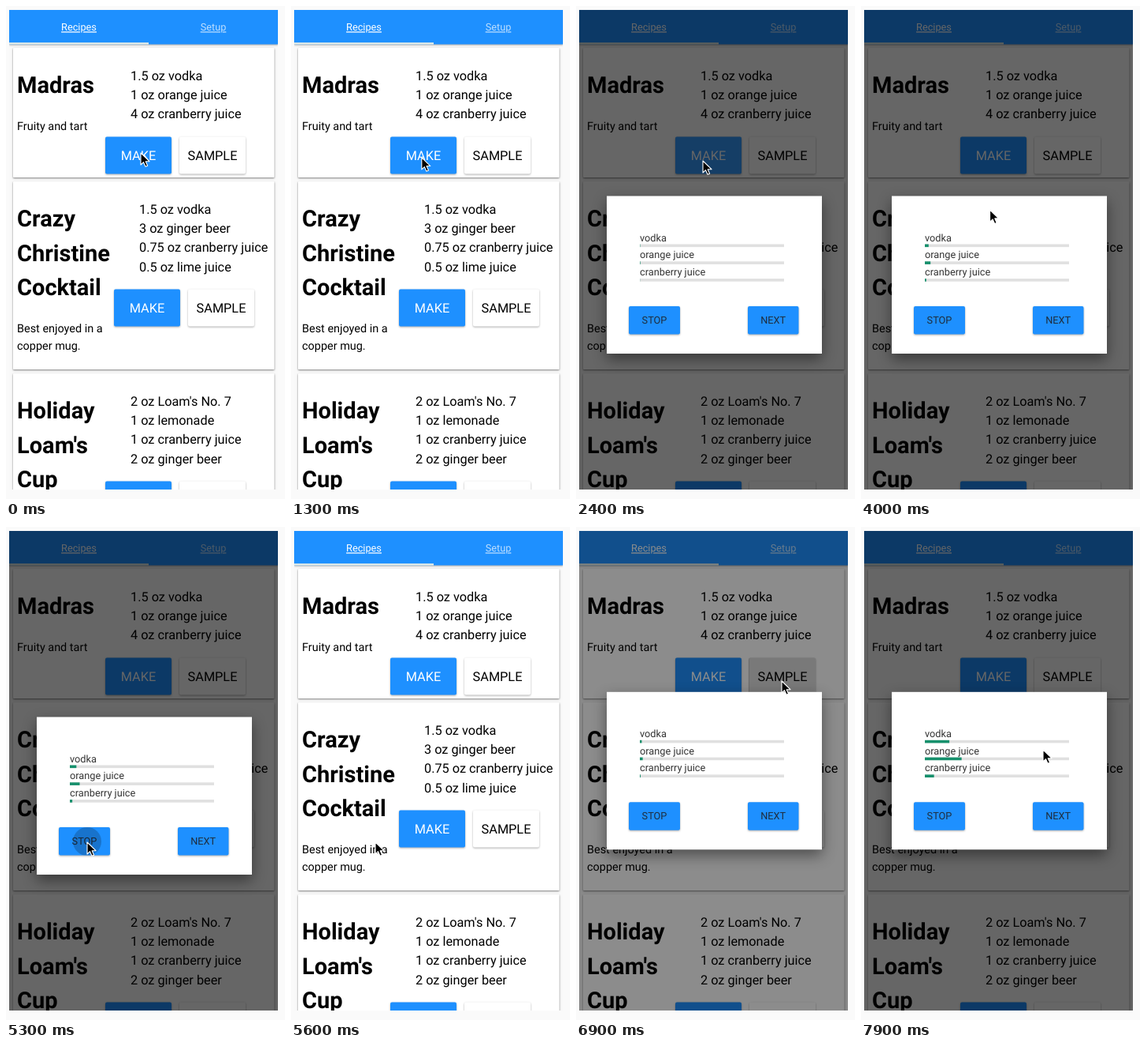
Animation, 354 px wide and 624 px high, one loop 8 s. Source, as an HTML page:

```html
<!DOCTYPE html>
<html lang="en">
<head>
<meta charset="utf-8">
<title>Drink recipes</title>
<style>
  html, body { margin: 0; height: 100%; overflow: hidden; background: #fafafa; }
  svg { display: block; width: 100vw; height: 100vh; font-family: Roboto, sans-serif; text-rendering: geometricPrecision; }
  .card { fill: #fff; filter: drop-shadow(0 1px 1.2px rgba(0, 0, 0, .5)); }
  .button { filter: drop-shadow(0 1px 1.2px rgba(0, 0, 0, .33)); }
  .panel { fill: #fff; filter: drop-shadow(0 7px 9px rgba(0, 0, 0, .45)); }
  .title { font-size: 29px; font-weight: 700; }
  .note { font-size: 14.45px; }
  .item { font-size: 16.3px; }
  .small { font-size: 12.75px; }
  .center { text-anchor: middle; }
  .tab { fill: #fff; text-decoration: underline; }
</style>
</head>
<body>
<svg viewBox="0 0 354 624">
  <defs>
    <clipPath id="screen"><rect x="4" y="5" width="341" height="607"/></clipPath>
    <clipPath id="stopShape"><rect x="67" y="380" width="65" height="35.5" rx="2"/></clipPath>
  </defs>
  <g clip-path="url(#screen)">
    <rect x="4" y="5" width="341" height="607" fill="#f9f9f9"/>
    <g id="cards"></g>
    <rect x="4" y="5" width="341" height="43.5" fill="#1e90ff" class="button"/>
    <rect x="4" y="46.3" width="177" height="2.2" fill="#f1f3e6"/>
    <text x="92.5" y="31.3" class="small center tab">Recipes</text>
    <text x="263" y="31.3" class="small center tab" opacity=".7">Setup</text>
    <rect id="makeFlash" x="126" y="165.5" width="84" height="47" rx="2" fill="#fff"/>
    <rect id="sampleFlash" x="219" y="165.5" width="85" height="47" rx="2"/>
    <rect id="shade" x="4" y="5" width="341" height="607"/>
    <g id="dialog"></g>
  </g>
  <path id="cursor" d="M0 0V15L3.5 11.7 6 17.3 8.6 16.2 6.2 10.7H11Z" stroke="#fff" stroke-width="1.1" stroke-linejoin="round"/>
</svg>
<script>
const LOOP = 8000, STEP = 100, BLUE = '#1e90ff';
const el = id => document.getElementById(id);
const text = (x, y, kind, words, fill = '#000') =>
  `<text x="${x}" y="${y}" class="${kind}" fill="${fill}">${words}</text>`;
const lines = (x, y, pitch, kind, list) =>
  list.map((words, i) => text(x, y + i * pitch, kind, words)).join('');
const button = (x, y, w, h, fill, label, kind, ink, drop) =>
  `<rect x="${x}" y="${y}" width="${w}" height="${h}" rx="2" fill="${fill}" class="button"/>` +
  text(x + w / 2, y + h / 2 + drop, kind + ' center', label, ink);

const recipes = [
  { top: 53, height: 164, x: 158, buttonTop: 165.5, title: ['Madras'], note: ['Fruity and tart'],
    items: ['1.5 oz vodka', '1 oz orange juice', '4 oz cranberry juice'] },
  { top: 222, height: 238, x: 169, buttonTop: 358.5, title: ['Crazy', 'Christine', 'Cocktail'],
    note: ['Best enjoyed in a', 'copper mug.'],
    items: ['1.5 oz vodka', '3 oz ginger beer', '0.75 oz cranberry juice', '0.5 oz lime juice'] },
  { top: 465, height: 238, x: 158, buttonTop: 601.5, title: ['Holiday', "Loam's", 'Cup'], note: [],
    items: ["2 oz Loam's No. 7", '1 oz lemonade', '1 oz cranberry juice', '2 oz ginger beer'] }
];
el('cards').innerHTML = recipes.map(r =>
  `<rect x="9" y="${r.top}" width="331.5" height="${r.height}" rx="1" class="card"/>` +
  lines(14, r.top + 57, 43.5, 'title', r.title) +
  lines(14, r.top + 60.5 + r.title.length * 43.5, 22, 'note', r.note) +
  lines(r.x, r.top + 40.5, 24.4, 'item', r.items) +
  button(r.x - 32, r.buttonTop, 84, 47, BLUE, 'MAKE', 'item', '#fff', 6) +
  button(r.x + 62, r.buttonTop, 84, 47, '#fff', 'SAMPLE', 'item', '#000', 6)
).join('');

// Pouring speed is inversely proportional to the amount of each ingredient.
const pours = [['vodka', 1.5], ['orange juice', 1], ['cranberry juice', 4]];
el('dialog').innerHTML =
  '<rect x="39" y="240.5" width="273" height="199.5" class="panel"/>' +
  pours.map(([name], i) => {
    const y = 301.5 + i * 21.8;
    return text(81, y - 4, 'small', name, '#333') +
      `<rect x="81" y="${y}" width="183" height="3.6" fill="#e0e0e0"/>` +
      `<rect id="bar${i}" x="81" y="${y}" height="3.6" fill="#16906c"/>`;
  }).join('') +
  button(67, 380, 65, 35.5, BLUE, 'STOP', 'small', '#1f2d3d', 4) +
  button(218, 380, 64.5, 35.5, BLUE, 'NEXT', 'small', '#1f2d3d', 4) +
  '<circle id="ripple" cx="103" cy="398" fill="#000" clip-path="url(#stopShape)"/>';

const clamp = v => Math.max(0, Math.min(1, v));
const ramp = (t, from, to) => clamp((t - from) / (to - from));
const pulse = (t, a, b, c, d) => ramp(t, a, b) * (1 - ramp(t, c, d));
const ease = v => v * v * (3 - 2 * v);

const cursorPath = [
  [0, 171, 186], [1000, 171, 186], [1500, 163, 195], [1700, 163, 195], [1800, 161, 196],
  [3700, 161, 196], [4200, 165, 292], [4300, 165, 292], [5200, 103, 399], [5400, 103, 399],
  [5600, 107, 399], [6500, 261, 195], [7100, 261, 195], [7700, 231, 282], [LOOP, 231, 282]
];
function cursorAt(t) {
  const i = cursorPath.findIndex(point => point[0] > t);
  const [t0, x0, y0] = cursorPath[i - 1], [t1, x1, y1] = cursorPath[i];
  const k = ease(ramp(t, t0, t1));
  return [x0 + (x1 - x0) * k, y0 + (y1 - y0) * k];
}

function draw(t) {
  const sampling = t >= 6000;
  const shown = sampling ? ramp(t, 6740, 6800) : pulse(t, 2060, 2160, 5380, 5500);
  const dim = sampling ? ramp(t, 6780, 6940) : pulse(t, 2220, 2380, 5380, 5540);
  el('shade').setAttribute('opacity', .6 * dim);
  el('dialog').setAttribute('opacity', shown);
  el('dialog').setAttribute('transform', `translate(0 ${sampling ? -31.7 : 0})`);

  const poured = sampling ? (t - 6815) * .043 : (t - 2250) * .0041;
  pours.forEach(([, amount], i) => el('bar' + i).setAttribute('width', Math.max(0, poured / amount)));

  el('makeFlash').setAttribute('opacity', .18 * pulse(t, 1900, 2100, 2250, 2600));
  el('sampleFlash').setAttribute('opacity', .14 * pulse(t, 6600, 6800, 6950, 7300));
  el('ripple').setAttribute('r', 18 + 20 * ramp(t, 5300, 5500));
  el('ripple').setAttribute('opacity', t >= 5300 && t < 5600 ? .2 : 0);
  el('cursor').setAttribute('transform', `translate(${cursorAt(t)})`);
}

const start = performance.now();
function frame() {
  const t = (performance.now() - start) % LOOP;
  draw(Math.floor(t / STEP) * STEP);
  requestAnimationFrame(frame);
}
frame();
</script>
</body>
</html>
```
